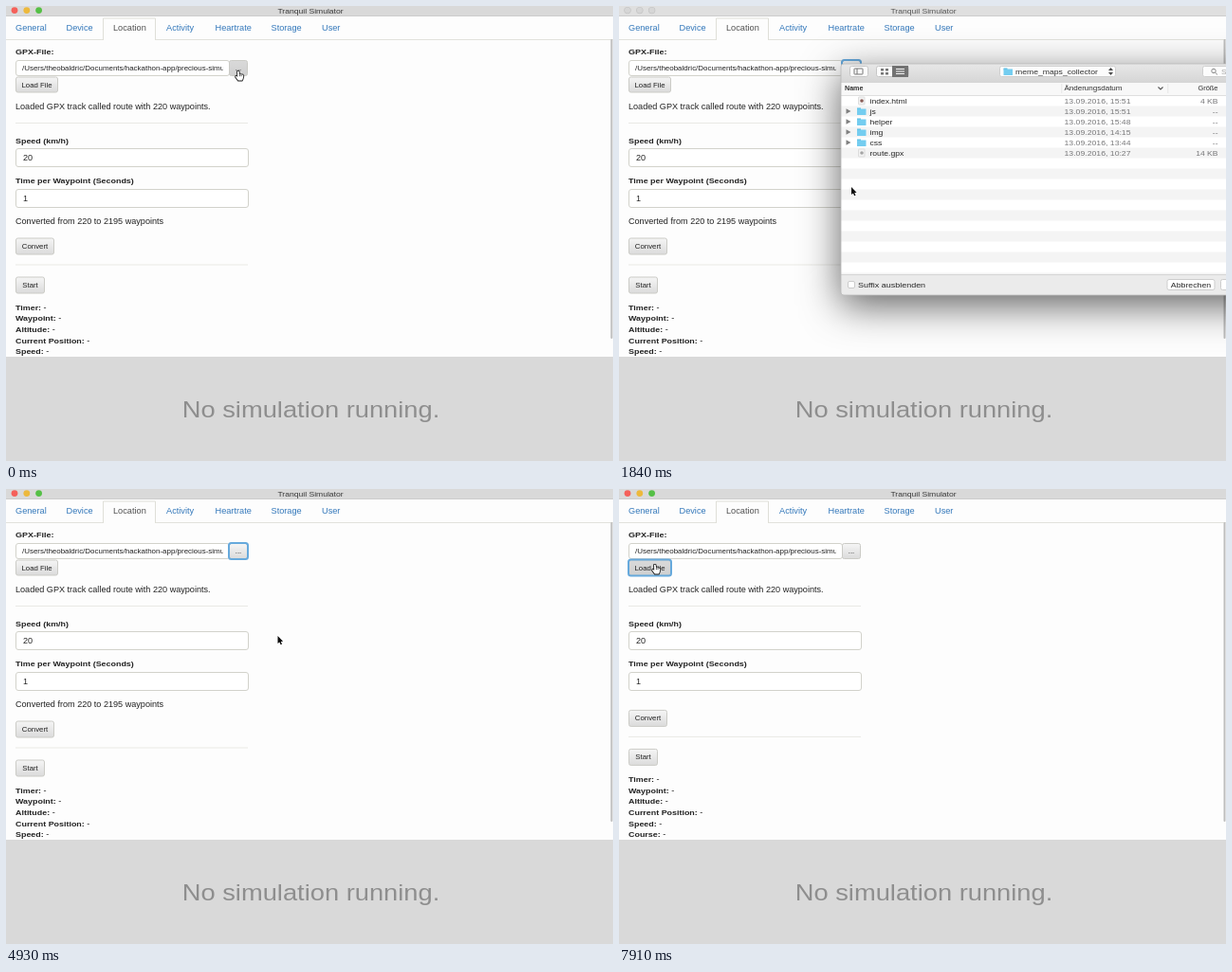
Recreate the animation shown at these times as an HTML page with a canvas. Size 640 by 480 pixels, loop 8000 ms.

```html
<!DOCTYPE html>
<html lang="en">
<head>
<meta charset="utf-8">
<title>Tranquil Simulator</title>
<style>
html, body { margin: 0; width: 100%; height: 100%; overflow: hidden; background: #fdfdfd; }
canvas { display: block; width: 640px; height: 480px; }
</style>
</head>
<body>
<canvas id="stage" width="640" height="480"></canvas>
<script>
const ctx = document.getElementById('stage').getContext('2d');
const LOOP = 8000;
const ASPECT = 1.114;
const PAPER = '#fdfdfd', BAR = '#d9d9d9', INK = '#222', LINE = '#d2d2cb', RULE = '#e9e9e5';
const RING = '#66a9dc', LINK = '#3277ba', WHITE = '#fff', ICON = '#757575';

// Time, x, y of the pointer tip.
const PATH = [
  [0, 245, 69], [1000, 245, 69], [1080, 245, 68], [1560, 245, 68], [1800, 245, 191],
  [2600, 245, 191], [3300, 286.5, 155], [5300, 286.5, 155], [6200, 97, 104],
  [6320, 97, 104], [6800, 38, 80], [8000, 38, 80]
];
const OPEN = 1180, OPENED = 1440, CLOSE = 4420, CLOSED = 4620, CLICK = 7080;

const clamp = v => Math.max(0, Math.min(1, v));
const ease = v => v * v * (3 - 2 * v);

function text(s, x, y, size, color = INK, bold = false, align = 'left') {
  ctx.save();
  ctx.translate(x, y);
  ctx.scale(ASPECT, 1);
  ctx.font = `${bold ? 'bold ' : ''}${size}px "Liberation Sans", Arial, sans-serif`;
  ctx.textAlign = align;
  ctx.fillStyle = color;
  ctx.fillText(s, 0, 0);
  const w = ctx.measureText(s).width * ASPECT;
  ctx.restore();
  return w;
}

function rect(x, y, w, h, color) {
  ctx.fillStyle = color;
  ctx.fillRect(x, y, w, h);
}

function box(x, y, w, h, r, fill, stroke, width = 1) {
  ctx.beginPath();
  ctx.roundRect(x, y, w, h, r);
  if (fill) { ctx.fillStyle = fill; ctx.fill(); }
  if (stroke) { ctx.strokeStyle = stroke; ctx.lineWidth = width; ctx.stroke(); }
}

function shape(points, fill, stroke, width = 1) {
  ctx.beginPath();
  points.forEach(([x, y]) => ctx.lineTo(x, y));
  ctx.closePath();
  if (stroke) { ctx.strokeStyle = stroke; ctx.lineWidth = width; ctx.stroke(); }
  if (fill) { ctx.fillStyle = fill; ctx.fill(); }
}

function line(points, color, width = 1) {
  ctx.beginPath();
  points.forEach(([x, y]) => ctx.lineTo(x, y));
  ctx.strokeStyle = color;
  ctx.lineWidth = width;
  ctx.stroke();
}

function disc(x, y, r, fill) {
  ctx.beginPath();
  ctx.arc(x, y, r, 0, 7);
  ctx.fillStyle = fill;
  ctx.fill();
}

function shade(y, h, top, bottom) {
  const g = ctx.createLinearGradient(0, y, 0, y + h);
  g.addColorStop(0, top);
  g.addColorStop(1, bottom);
  return g;
}

function button(label, x, y, w, h, focus, hover) {
  const fill = hover ? shade(y, h, '#dadada', '#cfcfcf') : shade(y, h, '#f6f6f6', '#dadada');
  box(x + .5, y + .5, w - 1, h - 1, 2, fill, '#cbcbc6');
  if (focus) box(x, y, w, h, 2.5, null, RING, 2);
  text(label, x + w / 2, y + h / 2 + 2.5, 7, INK, false, 'center');
}

function input(value, y) {
  box(10.5, y + .5, 245, 19, 2.5, WHITE, LINE);
  text(value, 18, y + 13, 8.17);
}

function titleBar(active) {
  rect(0, 0, 640, 10, active ? BAR : '#dfdfdf');
  rect(0, 10, 640, 1, '#cdcdcd');
  const colors = active ? ['#f5605a', '#edb93c', '#55c046'] : Array(3).fill('#d6d6d6');
  colors.forEach((color, i) => {
    const x = 9 + i * 12.8;
    if (!active) disc(x, 4.6, 3.7, '#c4c4c4');
    disc(x, 4.6, active ? 3.4 : 3, color);
  });
  text('Tranquil Simulator', 321, 7.8, 7.7, active ? '#383838' : '#555', false, 'center');
}

function tabs() {
  rect(0, 35, 640, 1, '#e2e2dc');
  rect(102, 12, 56, 24, PAPER);
  line([[102.5, 36], [102.5, 13], [157.5, 13], [157.5, 36]], '#dfdfd8');
  [['General', 10], ['Device', 63.5], ['Location', 113], ['Activity', 169],
    ['Heartrate', 220.5], ['Storage', 279.5], ['User', 333]].forEach(([s, x]) =>
    text(s, x, 26, 8.25, s === 'Location' ? '#505050' : LINK));
}

function page(t) {
  const loaded = t >= CLICK;
  const focusPick = t > 1040 && !loaded;
  const shift = loaded ? -11.6 : 0;
  tabs();
  text('GPX-File:', 10, 51, 8.1, INK, true);
  box(10.5, 57.5, 225, 16, 2.5, WHITE, LINE);
  ctx.save();
  ctx.beginPath();
  ctx.rect(12, 58, 217, 15);
  ctx.clip();
  text('/Users/theobaldric/Documents/hackathon-app/precious-simulator', 17, 68, 7.15);
  ctx.restore();
  button('...', 235, 57, 20, 17, focusPick, t < OPENED);
  button('Load File', 10, 74.5, 45, 17, loaded, t > 6700);
  text('Loaded GPX track called route with 220 waypoints.', 10, 109, 8.17);
  rect(10, 123, 245, 1, RULE);
  text('Speed (km/h)', 10, 144.5, 8, INK, true);
  input('20', 150);
  text('Time per Waypoint (Seconds)', 10, 187.3, 8, INK, true);
  input('1', 193);
  if (!loaded) text('Converted from 220 to 2195 waypoints', 10, 230.3, 8.17);

  ctx.save();
  ctx.beginPath();
  ctx.rect(0, 215, 640, 155);
  ctx.clip();
  ctx.translate(0, shift);
  button('Convert', 10, 244.5, 41, 18);
  rect(10, 272.5, 245, 1, RULE);
  button('Start', 10, 285.5, 31, 18);
  ['Timer:', 'Waypoint:', 'Altitude:', 'Current Position:', 'Speed:', 'Course:'].forEach((s, i) => {
    const y = 320.7 + i * 11.65;
    const w = text(s, 10, y, 8, INK, true);
    text('-', 12.5 + w, y, 8.17);
  });
  ctx.restore();

  box(637.5, 35, 2, 316, 1, '#bdbdbd');
  rect(0, 370, 640, 110, BAR);
  text('No simulation running.', 321.5, 434, 24.5, '#8e8e8e', false, 'center');
}

function folder(x, y) {
  rect(x, y - 3.5, 4, 2, '#5dbde4');
  rect(x, y - 2.5, 9.5, 6.5, '#74cdf0');
}

function toolbar() {
  box(243.5, 63.5, 19, 11, 2, '#fbfbfb', '#c6c6c6');
  box(248, 66, 9, 6, .5, null, ICON);
  line([[251, 66], [251, 72]], ICON);
  box(271.5, 63.5, 34, 11, 2, '#fbfbfb', '#c6c6c6');
  rect(288, 63, 17, 12, '#737373');
  [[276, 66], [281, 66], [276, 70], [281, 70]].forEach(([x, y]) => rect(x, y, 3, 2.5, ICON));
  [66, 68.5, 71].forEach(y => rect(292, y, 9, 1, '#f8f8f8'));
  box(401.5, 63.5, 122, 11, 2, '#fcfcfc', '#cfcfcf');
  folder(405.5, 69);
  text('meme_maps_collector', 418, 72, 7.75, '#303030');
  shape([[516, 68], [518.5, 65], [521, 68]], '#4a4a4a');
  shape([[516, 70], [518.5, 73], [521, 70]], '#4a4a4a');
  box(615.5, 63.5, 65, 11, 2, '#fcfcfc', '#cfcfcf');
  ctx.beginPath();
  ctx.arc(627, 68.5, 2.2, 0, 7);
  ctx.strokeStyle = '#8a8a8a';
  ctx.lineWidth = 1;
  ctx.stroke();
  line([[628.6, 70.2], [631, 72.5]], '#8a8a8a');
  text('Suchen', 635, 72, 7.5, '#a4a4a4');
}

function fileList() {
  rect(234, 80, 453, 203, WHITE);
  rect(234, 80, 453, 14, '#f8f8f8');
  rect(234, 80, 453, .8, '#cdcdcd');
  rect(234, 94, 453, .8, '#d8d8d8');
  for (let y = 105.5; y < 282; y += 22) rect(234, y, 453, Math.min(11, 283 - y), '#f4f4f4');
  text('Name', 238, 89.3, 6.4, '#303030', true);
  text('Änderungsdatum', 469.5, 89.3, 7.2, '#303030');
  text('Größe', 631.5, 89.3, 6.7, '#303030', false, 'right');
  text('Art', 645, 89.3, 6.7, '#303030');
  line([[568.5, 85.5], [571, 88], [573.5, 85.5]], '#555', 1.1);
  [466.5, 578.5, 640.5].forEach(x => rect(x, 82, .7, 10, '#dedede'));

  [['index.html', '15:51', '4 KB', 'HTML-doku'], ['js', '15:51'], ['helper', '15:48'],
    ['img', '14:15'], ['css', '13:44'], ['route.gpx', '10:27', '14 KB', 'GPX File']
  ].forEach(([name, time, size, kind], i) => {
    const y = 100 + i * 11, soft = '#777779';
    if (size) {
      box(252.5, y - 4, 6.5, 8, .5, '#f3f3f3', '#d2d2d2', .7);
      disc(256, y, 1.8, i ? '#a5a5a5' : '#8a5c55');
    } else {
      shape([[239.5, y - 2.8], [244.5, y], [239.5, y + 2.8]], '#808080');
      folder(251, y);
    }
    text(name, 264.5, y + 2.8, 7.7, '#252525');
    text('13.09.2016, ' + time, 469.5, y + 2.8, 7.8, soft);
    text(size || '--', 631.5, y + 2.8, 7.7, soft, false, 'right');
    text(kind || 'Ordner', 645, y + 2.8, 7.7, soft);
  });
}

function dialog(scale, alpha) {
  ctx.save();
  ctx.translate(461, 182.5);
  ctx.scale(scale, scale);
  ctx.translate(-461, -182.5);
  ctx.globalAlpha = alpha;
  ctx.save();
  ctx.shadowColor = 'rgba(0,0,0,.62)';
  ctx.shadowBlur = 40 * scale;
  ctx.shadowOffsetY = 11 * scale;
  box(234, 61, 453, 244, 3, '#ebebeb');
  ctx.restore();

  ctx.save();
  ctx.beginPath();
  ctx.roundRect(234, 61, 453, 244, 3);
  ctx.clip();
  rect(234, 61, 453, 19, shade(61, 19, '#e8e8e8', '#d6d6d6'));
  toolbar();
  fileList();
  rect(234, 283, 453, 22, '#ebebeb');
  rect(234, 283, 453, .8, '#d0d0d0');
  box(241.5, 290.5, 7, 7, 1.5, WHITE, '#cbcbcb');
  text('Suffix ausblenden', 252, 297, 8.05, '#282828');
  box(578, 288.5, 50, 11, 2, WHITE, '#cdcdcd');
  text('Abbrechen', 603, 296.7, 7.85, '#282828', false, 'center');
  box(634.5, 288.5, 44, 11, 2, WHITE, '#cdcdcd');
  text('Öffnen', 656.5, 296.7, 7.7, '#b5b5b5', false, 'center');
  ctx.restore();
  box(234, 61, 453, 244, 3, null, '#b8b8b8', .8);
  ctx.restore();
}

function drawDialog(t) {
  if (t < OPEN || t >= CLOSED) return;
  if (t < CLOSE) {
    const p = clamp((t - OPEN) / (OPENED - OPEN));
    dialog(.5 + .5 * p, clamp(.3 + .8 * p));
  } else {
    const p = ease(clamp((t - CLOSE) / (CLOSED - CLOSE)));
    dialog(1 - .5 * p, 1 - p);
  }
}

function pointerAt(t) {
  const i = Math.max(1, PATH.findIndex(k => k[0] > t));
  const [t0, x0, y0] = PATH[i - 1], [t1, x1, y1] = PATH[i];
  const p = ease(clamp((t - t0) / (t1 - t0)));
  return [x0 + (x1 - x0) * p, y0 + (y1 - y0) * p];
}

function arrow() {
  shape([[0, 0], [0, 8], [1.9, 6.4], [3.1, 9.3], [4.5, 8.7], [3.3, 5.9], [5.6, 5.8]],
    '#0c0c0c', WHITE, 1.4);
}

function hand() {
  shape([[-1, 0], [.6, 0], [1.1, 3], [4.6, 3.6], [5.4, 4.8], [4.6, 8.2], [3.8, 9.6],
    [-.2, 9.6], [-3, 5.8], [-2.6, 4.8], [-.8, 5.8]], WHITE, '#161616', 1.6);
  line([[1.4, 3.2], [1.4, 5.2]], '#161616', .7);
  line([[3.1, 3.6], [3.1, 5.2]], '#161616', .7);
}

function beam() {
  line([[-1.8, -4.2], [0, -3.4], [1.8, -4.2]], INK);
  line([[0, -3.4], [0, 3.6]], INK, 1.1);
  line([[-1.8, 4.4], [0, 3.6], [1.8, 4.4]], INK);
  line([[-1.2, 1.2], [1.2, 1.2]], INK, .8);
}

function pointer(t) {
  ctx.save();
  ctx.translate(...pointerAt(t));
  if (t < 1080 || t > 6640) hand();
  else if (t > 6100 && t < 6460) beam();
  else arrow();
  ctx.restore();
}

function draw(now) {
  const t = now % LOOP;
  rect(0, 0, 640, 480, PAPER);
  page(t);
  titleBar(t < OPEN || t >= CLOSED);
  drawDialog(t);
  pointer(t);
  requestAnimationFrame(draw);
}
requestAnimationFrame(draw);
</script>
</body>
</html>
```
